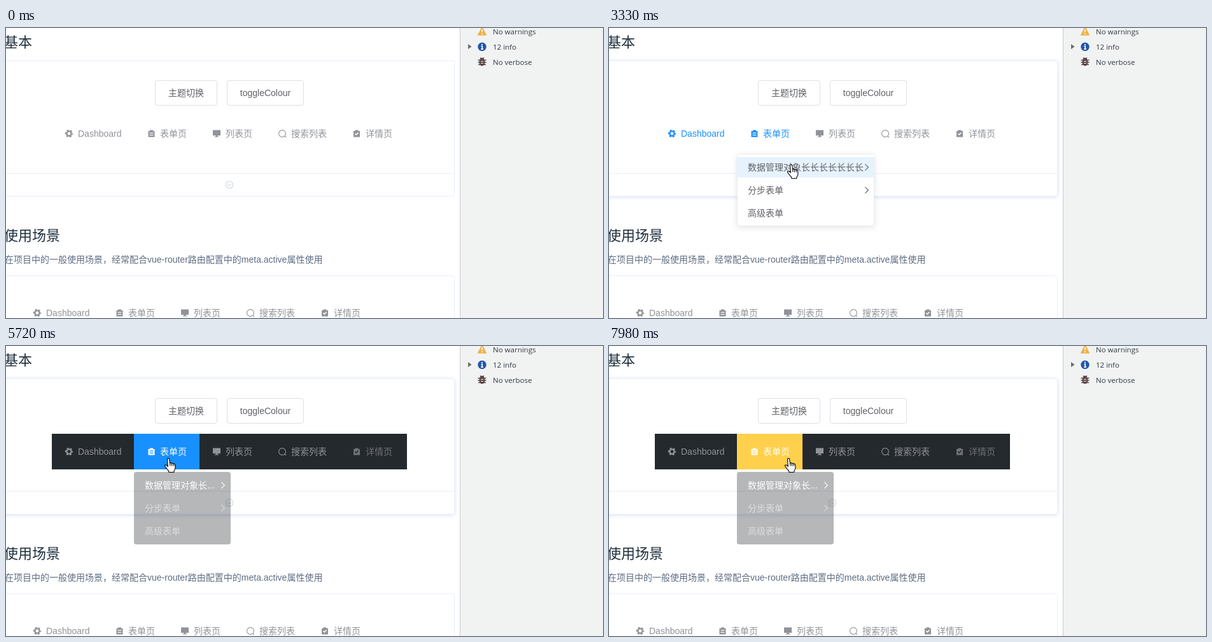
Recreate the animation shown at these times as an HTML page. Size 938x456 px, loop 8 s.

```html
<!DOCTYPE html>
<html lang="zh-CN">
<head>
<meta charset="utf-8">
<title>Menu demo</title>
<style>
html, body { margin: 0; width: 100%; height: 100%; overflow: hidden; background: #fff; }
svg { display: block; width: 938px; height: 456px; }
text { font: 14px "Liberation Sans", "Noto Sans CJK SC", "Noto Sans CJK", sans-serif; fill: currentColor; white-space: pre; }
.head { font-size: 22px; }
.tool text { font: 11.5px "Open Sans", "Noto Sans", sans-serif; }
.pop { filter: drop-shadow(0 2px 5px rgba(0, 0, 0, .11)); }
.lift { filter: drop-shadow(0 1px 3px rgba(205, 216, 245, .8)); }
</style>
</head>
<body>
<svg id="stage" viewBox="0 0 938 456"></svg>
<script>
const LOOP = 8000;
const BLUE = [24, 144, 255], YELLOW = [255, 208, 75], GREY = [144, 147, 153], WHITE = [255, 255, 255], DIM = [112, 115, 118];
const LONG = '数据管理对象长长长长长长长';

const rgb = c => `rgb(${c.map(Math.round)})`;
const mix = (a, b, k) => a.map((v, i) => v + (b[i] - v) * k);
const ramp = (t, a, b) => Math.min(1, Math.max(0, (t - a) / (b - a)));
const within = (t, a, b) => t >= a && t < b;

// Piecewise interpolation over [time, ...values] keys.
function track(keys, t, ease = k => k) {
  let i = 0;
  while (i < keys.length - 2 && t >= keys[i + 1][0]) i++;
  const [ta, ...a] = keys[i], [tb, ...b] = keys[i + 1];
  return mix(a, b, ease(ramp(t, ta, tb)));
}
const smooth = k => k * k * (3 - 2 * k);

const board = 'M-5-4h2.5v-1.6h5v1.6h2.5v9.6h-10z';
const fill = d => `<path d="${d}" fill="currentColor" fill-rule="evenodd"/>`;
const line = (d, w = 1.1) => `<path d="${d}" fill="none" stroke="currentColor" stroke-width="${w}"/>`;
const ICONS = {
  gear: `<g fill="none" stroke="currentColor"><circle r="3.6" stroke-width="2.4"/>
    <circle r="5.3" stroke-width="2" stroke-dasharray="2.85 2.7" stroke-dashoffset="1.4"/></g>`,
  form: fill(board + 'M-3-1.4h6v1.2h-6zM-3 1.8h6v1.2h-6z'),
  screen: fill('M-6-5.5h12v8.5h-4.5v1.5h2v1h-7v-1h2v-1.5h-4.5z'),
  search: '<circle r="5.4" fill="none" stroke="currentColor" stroke-width="1.1"/>' + line('M3.8 3.8L6 6'),
  check: fill(board + 'M-3.2.5l1.1-1.1 1.4 1.4 2.8-2.8 1.1 1.1-3.9 3.9z'),
  star: line('M0-5.6L1.7-2 5.6-1.5 2.8 1.3 3.5 5.2 0 3.4-3.5 5.2-2.8 1.3-5.6-1.5-1.7-2z'),
  sliders: line('M-5.5-4h11M-5.5 0h11M-5.5 4h11') + fill('M1-5.5h2.4v3H1zM-3.5-1.5h2.4v3h-2.4zM1 2.5h2.4v3H1z'),
  bag: fill('M-5.5-3h3v-2h5v2h3v3h-11zM-1.4-4v1h2.8v-1zM-5.5.8h11v4h-11z'),
  arrow: line('M-2.6-4.8L2.4 0-2.6 4.8')
};
const icon = (name, x, y) => `<g transform="translate(${x} ${y})">${ICONS[name]}</g>`;
const text = (s, x, y, extra = '') => `<text x="${x}" y="${y + 5}" ${extra}>${s}</text>`;
const box = (x, y, w, h, extra) => `<rect x="${x}" y="${y}" width="${w}" height="${h}" ${extra}/>`;

const NAV = [
  ['gear', 99, 'Dashboard', 113], ['form', 228.5, '表单页', 242], ['screen', 331, '列表页', 345],
  ['search', 434, '搜索列表', 448], ['check', 551, '详情页', 565]
];
const nav = (dx, y, id) => NAV.map(([name, ix, label, tx], i) =>
  `<g id="${id}${i}" color="${rgb(GREY)}">${icon(name, ix + dx, y)}${text(label, tx + dx, y)}</g>`).join('');

const button = (id, x, w, label) => `<g id="${id}">
  ${box(x + .5, 82.5, w - 1, 39, 'rx="3.5"')}${text(label, x + w / 2, 102, 'text-anchor="middle"')}</g>`;
const popBox = (x, y, w, h) => box(x, y, w, h, 'rx="3" fill="#fff" stroke="#ebeef5" class="pop"');
const hoverRow = (id, x, y, w) => box(x, y, w, 32, `id="${id}" fill="#e6f3fe"`);

const scene = `
<g color="#1f2f3d">${text('基本', -3, 25, 'class="head"')}${text('使用场景', -3, 329, 'class="head"')}</g>
<g color="#5e6d82">${text('在项目中的一般使用场景，经常配合vue-router路由配置中的meta.active属性使用', -2, 364)}</g>
<g fill="#fff" stroke="#eaeefb">
  ${box(-20.5, 51.5, 725, 213, 'id="panel" rx="3"')}
  <path d="M0 228.5H704"/>
  ${box(-20.5, 389.5, 725, 120, 'rx="3"')}
</g>
<g fill="none" stroke="#d3dce6" stroke-width="1.3"><circle cx="351" cy="246.5" r="5.6"/><path d="M348.2 245.4l2.8 2.8 2.8-2.8"/></g>
${button('theme', 234, 98, '主题切换')}${button('toggle', 347, 121, 'toggleColour')}
<g id="bar">${box(72, 138, 558, 56, 'fill="#24292e"')}${box(201, 138, 103, 56, 'id="activeBg"')}</g>
${nav(0, 166, 'nav')}${nav(-50, 448, 'low')}

<g class="tool" color="#303942">
  ${box(713, 0, 225, 456, 'fill="#f1f3f3"')}<path d="M713.5 0V456" stroke="#c9cbcc"/>
  <path d="M748-1L754.2 11H741.8z" fill="#f0b14a" stroke="#f0b14a" stroke-width="1.6" stroke-linejoin="round"/>
  <path d="M748 2v4.6M748 8.2v1.7" stroke="#fff" stroke-width="1.7"/>
  <path d="M726 25.2L731.6 29.2 726 33.2z" fill="#6e6e6e"/>
  <circle cx="748" cy="29.5" r="6.7" fill="#2457a8"/>
  <path d="M748 25v2M746.5 28.6h1.7v4.6M746.2 33.2h3.8" fill="none" stroke="#fff" stroke-width="1.7"/>
  <g stroke="#5d4545" stroke-width="1.5" fill="#5d4545"><path d="M741.5 50.5h13M741.5 54h13M742 57.5h12M745 47l6 2M751 47l-6 2"/>
  <ellipse cx="748" cy="53.6" rx="3.7" ry="5.2"/></g>
  <path d="M746 52.4h4M746 55.4h4" stroke="#f1f3f3"/>
  ${text('No warnings', 765, 5)}${text('12 info', 765, 29)}${text('No verbose', 765, 53)}
</g>

<g id="dashMenu">${popBox(72.5, 198.5, 151, 112.5)}${hoverRow('dashRow', 73, 239, 150)}
  <g color="#bfbfc2">${icon('star', 96, 219)}${text('分析页', 110, 219)}</g>
  <g color="#606266">${icon('sliders', 96, 255)}${text('监控页', 110, 255)}${icon('bag', 96, 291)}${text('工作台', 110, 291)}</g>
</g>
<g id="formMenu" color="#606266">${popBox(201.5, 198.5, 215, 112.5)}${hoverRow('formRow', 202, 203, 214)}
  <g id="formFirst">${text(LONG, 218, 219)}${icon('arrow', 405, 219)}</g>
  ${text('分步表单', 218, 255)}${icon('arrow', 405, 255)}${text('高级表单', 218, 291)}
</g>
<g id="subMenu">${popBox(421.5, 199.5, 216, 40.5)}${hoverRow('subRow', 422, 204, 215)}
  <g id="subText">${text(LONG, 439, 220)}</g>
</g>
<g id="darkMenu">${box(201, 198, 152, 114, 'rx="4" fill="#24292e"')}
  <g color="#fff">${text('数据管理对象长...', 218, 219)}${icon('arrow', 341, 219)}</g>
  <g color="#96999d">${text('分步表单', 218, 255)}${icon('arrow', 341, 255)}${text('高级表单', 218, 291)}</g>
</g>
<circle id="halo" r="12" fill="#ffee00" opacity=".6"/>
<g id="cursor" stroke="#000" stroke-linejoin="round">
  <path id="hand" fill="#fff" stroke-width="1.1" d="M-1.6 1.2Q-1.4-.4 0-.4T1.7 1.2L2.5 7.2Q4.2 5.8 5.2 7.8 7 6.4 8 8.4 10 7.4 10.6 9.6L11 14.2Q10.8 17 9.2 18.8L8.8 21.5H1L.4 19.2Q-1.8 17.4-3.4 14.6-5.4 12.2-5.6 10.8-4.4 9-2.2 11L-.6 12.4z
    M2.5 7.2l.6 4.2M5.2 7.8l.5 3.8M8 8.4l.4 3.4"/>
  <path id="pointer" fill="#fff" d="M0 0V16.5L3.8 12.9 6.4 18.8 9 17.7 6.4 12H11.6z"/>
</g>`;

const stage = document.getElementById('stage');
stage.innerHTML = scene;
const el = {};
stage.querySelectorAll('[id]').forEach(n => el[n.id] = n);
const set = (id, attrs) => { for (const k in attrs) el[id].setAttribute(k, attrs[k]); };
const show = (id, k) => set(id, { opacity: k, display: k > 0 ? 'inline' : 'none' });

const PATH = [
  [60, 738, 460], [400, 440, 345], [830, 262, 182], [910, 255, 172], [1130, 135, 158], [1450, 130, 164],
  [1710, 136, 224], [1780, 136, 232], [1860, 137, 258], [2080, 137, 258], [2690, 254, 170], [2950, 260, 168],
  [3330, 286, 215], [3620, 286, 215], [4200, 468, 213], [4480, 468, 213], [4850, 290, 104], [5080, 292, 104],
  [5320, 300, 116], [5400, 255, 177], [5860, 255, 177], [6180, 385, 102], [6420, 385, 102], [6650, 270, 177],
  [6800, 270, 177], [6990, 380, 102], [7390, 380, 102], [7680, 282, 177], [8000, 282, 177]
];
const DARK_MENU = [
  [5640, 0], [5720, .33], [5880, 1], [6180, 1], [6400, 0], [6640, 0], [6820, 1],
  [7030, 1], [7110, .33], [7220, 0], [7900, 0], [7975, .33], [8000, .33]
];
const CLICKS = [1930, 4210, 4910, 6920];

function draw(t) {
  const [x, y] = track(PATH, t, smooth);
  const over = (x0, y0, x1, y1) => t > 70 && x >= x0 && x < x1 && y >= y0 && y < y1;
  const dark = ramp(t, 4960, 5240);

  const dash = ramp(t, 1400, 1640) * (1 - ramp(t, 2090, 2350));
  const form = ramp(t, 2860, 3080) * (1 - ramp(t, 4420, 4680));
  const sub = ramp(t, 3620, 3850) * (1 - ramp(t, 4390, 4550));
  show('dashMenu', dash);
  show('formMenu', form);
  show('subMenu', sub);
  show('darkMenu', track(DARK_MENU, t)[0]);
  show('dashRow', over(73, 239, 223, 271) ? 1 : 0);
  show('formRow', over(202, 203, 416, 235) ? 1 : 0);
  show('subRow', over(422, 204, 637, 236) ? 1 : 0);

  const picked = ramp(t, 4230, 4380);
  const pick = rgb(mix([96, 98, 102], BLUE, picked));
  set('formFirst', { color: pick });
  set('subText', { color: pick });

  // Header colours: hover, open menu, chosen page.
  NAV.forEach((_, i) => {
    let c = GREY;
    if (i === 0) {
      const hot = within(t, 1100, 4230) ? 1 : 1 - picked;
      if (t >= 1100) c = mix(GREY, BLUE, hot);
    } else if (i === 1) {
      const hot = over(201, 138, 304, 194) || t >= 2860;
      c = mix(hot ? BLUE : GREY, WHITE, dark);
    } else if (i === 4) c = mix(GREY, DIM, dark);
    set('nav' + i, { color: rgb(c) });
  });
  show('bar', dark);
  set('activeBg', { fill: rgb(mix(BLUE, YELLOW, ramp(t, 6990, 7204))) });

  const onTheme = over(234, 82, 332, 122), onToggle = over(347, 82, 468, 122);
  [['theme', onTheme], ['toggle', onToggle]].forEach(([id, on]) => {
    set(id, { color: on ? '#409eff' : '#606266' });
    const r = el[id].firstElementChild;
    r.setAttribute('fill', on ? '#ecf5ff' : '#fff');
    r.setAttribute('stroke', on ? '#c6e2ff' : '#dcdfe6');
  });
  set('panel', { class: within(t, 2500, 3700) || t > 4750 ? 'lift' : '' });

  const hand = onTheme || onToggle || over(72, 138, 630, 194) || dash && over(73, 198, 223, 311)
    || form && over(201, 198, 417, 311) || sub && over(417, 198, 637, 240);
  const at = `translate(${x} ${y})`;
  set('cursor', { transform: at });
  show('cursor', t >= 70 ? 1 : 0);
  show('hand', hand ? 1 : 0);
  show('pointer', hand ? 0 : 1);
  set('halo', { cx: x - 2, cy: y });
  show('halo', CLICKS.some(c => within(t, c, c + 140)) ? .6 : 0);
}

const start = performance.now();
function tick() {
  draw((performance.now() - start) % LOOP);
  requestAnimationFrame(tick);
}
tick();
</script>
</body>
</html>
```
